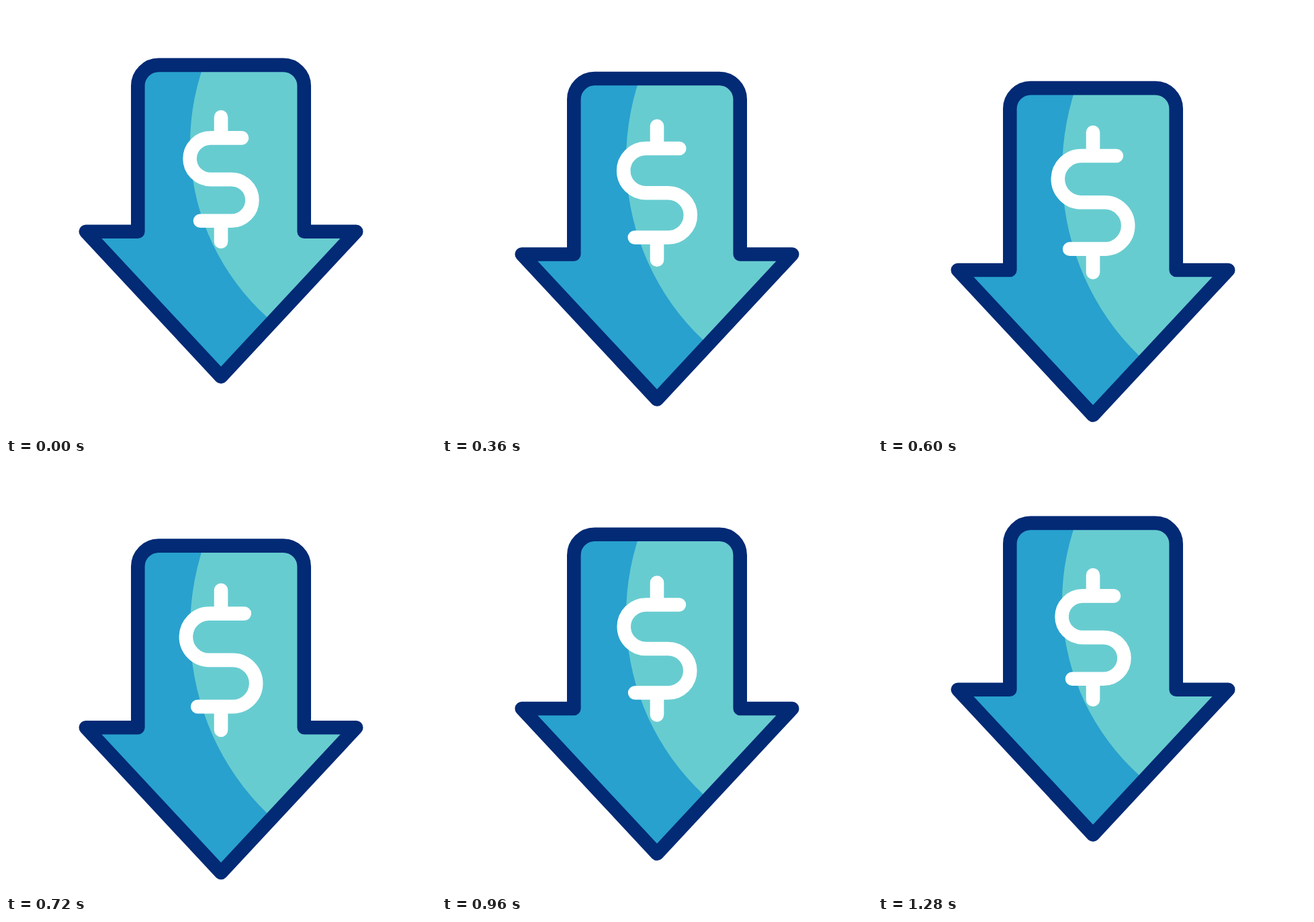
An HTML page that plays this animation: 640 by 640 pixels, repeating every 1440 ms.

```html
<!DOCTYPE html>
<html lang="en">
<head>
<meta charset="utf-8">
<title>Falling price arrow</title>
<style>
  html, body { margin: 0; height: 100%; overflow: hidden; background: #fff; }
  svg { display: block; width: 100vw; height: 100vh; }
  .line { fill: none; stroke-width: 20.6; stroke-linecap: round; stroke-linejoin: round; }
</style>
</head>
<body>
<svg viewBox="0 0 640 640">
  <clipPath id="inside"><path class="arrow"/></clipPath>
  <g clip-path="url(#inside)">
    <rect width="640" height="640" fill="#28a1ce"/>
    <ellipse id="shine" cx="622" rx="348" fill="#67ccd0"/>
  </g>
  <path class="arrow line" stroke="#032a75"/>
  <path id="dollar" class="line" stroke="#fff" vector-effect="non-scaling-stroke"
    d="M31-61.7H-15.6a30.85 30.85 0 0 0 0 61.7H15.6a30.85 30.85 0 0 1 0 61.7H-31M0-92.7v31M0 61.7v31"/>
</svg>
<script>
const LOOP = 1440, STEP = 40, DROP = 57.6;
const arrows = document.querySelectorAll('.arrow');
const shine = document.getElementById('shine');
const dollar = document.getElementById('dollar');

// Cubic Bezier easing (.58, 0, .42, 1), solved by bisection
function ease(x) {
  if (x <= 0) return 0;
  if (x >= 1) return 1;
  let low = 0, high = 1, u;
  for (let i = 0; i < 24; i++) {
    u = (low + high) / 2;
    const bx = 1.74 * u * (1 - u) ** 2 + 1.26 * u * u * (1 - u) + u ** 3;
    if (bx < x) low = u; else high = u;
  }
  return u * u * (3 - 2 * u);
}

function draw(time) {
  const p = ease((time - 30) / 615) - ease((time - 640) / 635);
  const head = DROP * p, lift = head * 0.597;
  const top = 87.9 + lift, shoulder = 335.7 + head, tip = 551.7 + head;

  const outline = `M227.2 ${top}H412.8a30.9 30.9 0 0 1 30.9 30.9V${shoulder}H521.2` +
    `L320 ${tip}L118.8 ${shoulder}H196.3V${top + 30.9}a30.9 30.9 0 0 1 30.9-30.9Z`;
  arrows.forEach(arrow => arrow.setAttribute('d', outline));

  const stretch = 1 + (head - lift) / 365;
  shine.setAttribute('cy', 98 + lift + 107 * stretch);
  shine.setAttribute('ry', 348 * stretch);

  dollar.setAttribute('transform', `translate(320 ${258.1 + 34.4 * p}) scale(${1 + 0.125 * p})`);
}

const start = performance.now();
function tick() {
  const time = (performance.now() - start) % LOOP;
  draw(Math.floor(time / STEP) * STEP);
  requestAnimationFrame(tick);
}
tick();
</script>
</body>
</html>
```
